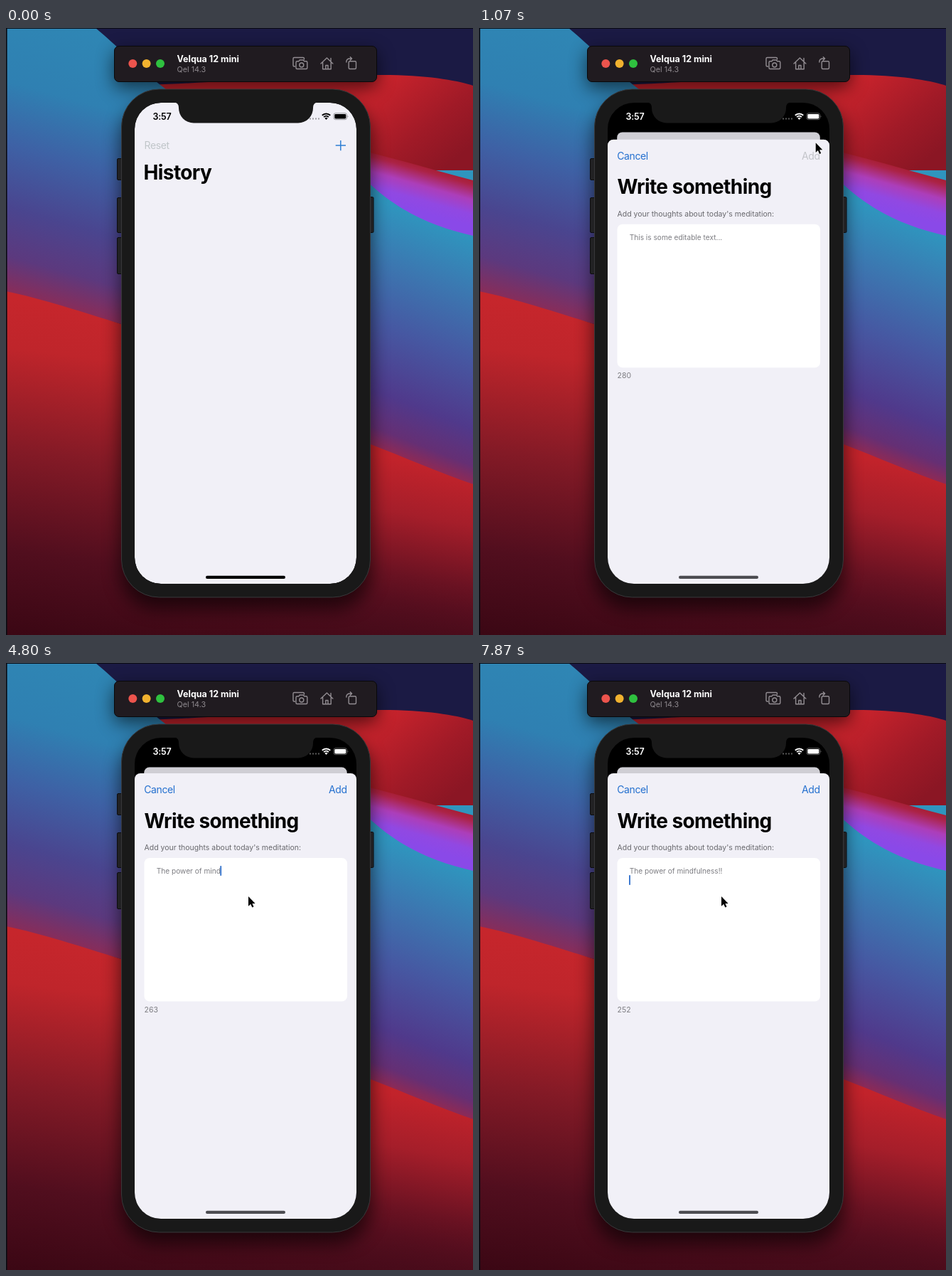
Animation of 657x853 px, one loop 8000 ms. Source, as an HTML page:

```html
<!DOCTYPE html>
<html lang="en">
<head>
<meta charset="utf-8">
<title>Writing a history entry</title>
<style>
  html, body { margin: 0; width: 100%; height: 100%; overflow: hidden; background: #000; }
  svg { display: block; width: 100%; height: 100%; }
  text { font-family: Inter, Roboto, sans-serif; font-optical-sizing: none; white-space: pre; }
  .title { font-size: 28px; font-weight: 700; letter-spacing: -.6px; }
  .bar { font-size: 14px; letter-spacing: -.4px; }
  .note { font-size: 10.5px; }
  .body { font-size: 10.15px; fill: #7d7d82; }
  .line { fill: none; stroke: #928d92; stroke-width: 1.4; stroke-linejoin: round; stroke-linecap: round; }
</style>
</head>
<body>
<svg viewBox="0 0 657 853" preserveAspectRatio="none">
  <defs>
    <linearGradient id="blueL" gradientUnits="userSpaceOnUse" x1="110" y1="0" x2="7" y2="374">
      <stop offset="0" stop-color="#2f86b4"/><stop offset=".26" stop-color="#2f80b2"/>
      <stop offset=".48" stop-color="#3e61a5"/><stop offset=".7" stop-color="#4a458f"/>
      <stop offset=".87" stop-color="#5c397e"/><stop offset="1" stop-color="#8a2c58"/>
    </linearGradient>
    <linearGradient id="redL" gradientUnits="userSpaceOnUse" x1="60" y1="385" x2="0" y2="853">
      <stop offset="0" stop-color="#c6262c"/><stop offset=".15" stop-color="#bf252b"/>
      <stop offset=".45" stop-color="#841a26"/><stop offset=".75" stop-color="#510e1e"/>
      <stop offset="1" stop-color="#3b0714"/>
    </linearGradient>
    <linearGradient id="redTop" gradientUnits="userSpaceOnUse" x1="530" y1="75" x2="625" y2="190">
      <stop offset="0" stop-color="#c8232c"/><stop offset=".6" stop-color="#a01a27"/>
      <stop offset="1" stop-color="#8b1624"/>
    </linearGradient>
    <linearGradient id="purple" gradientUnits="userSpaceOnUse" x1="570" y1="186" x2="552" y2="250">
      <stop offset="0" stop-color="#a51c2c"/><stop offset=".15" stop-color="#ab2346"/>
      <stop offset=".45" stop-color="#ac3eb9"/><stop offset=".75" stop-color="#9148e2"/>
      <stop offset="1" stop-color="#8a49e8"/>
    </linearGradient>
    <linearGradient id="blueR" gradientUnits="userSpaceOnUse" x1="585" y1="265" x2="468" y2="566">
      <stop offset="0" stop-color="#2f95be"/><stop offset=".25" stop-color="#3c76b0"/>
      <stop offset=".5" stop-color="#4658a2"/><stop offset=".78" stop-color="#50398b"/>
      <stop offset=".93" stop-color="#652f74"/><stop offset="1" stop-color="#8a2a58"/>
    </linearGradient>
    <linearGradient id="redR" gradientUnits="userSpaceOnUse" x1="585" y1="612" x2="540" y2="853">
      <stop offset="0" stop-color="#c2232b"/><stop offset=".3" stop-color="#a51e2a"/>
      <stop offset=".65" stop-color="#6a1222"/><stop offset="1" stop-color="#47091a" stop-opacity="0"/>
    </linearGradient>
    <filter id="blur" x="-30%" y="-30%" width="160%" height="180%"><feGaussianBlur stdDeviation="13"/></filter>
    <clipPath id="screen"><rect x="181" y="105" width="312" height="676" rx="37"/></clipPath>
  </defs>

  <!-- wallpaper -->
  <rect width="657" height="853" fill="#1b1a44"/>
  <path fill="url(#redTop)" d="M205 80C300 76 450 66 540 66C600 67 640 75 657 81V320H205Z"/>
  <path fill="url(#blueL)" d="M0 0H126C160 28 178 50 225 86L330 150V490L162 416L0 372Z"/>
  <path fill="url(#redL)" d="M0 370C50 380 110 400 162 416L330 470H657V853H0Z"/>
  <path fill="url(#blueR)" d="M500 200H657V650H500Z"/>
  <path fill="url(#purple)" d="M500 172C550 184 600 199 657 214V292C600 279 550 258 500 208Z"/>
  <path fill="url(#redR)" d="M330 500L513 585C560 603 610 625 657 641V853H330Z"/>
  <path fill="#0a0b12" d="M0 0H657V1H1.6V853H0Z"/>

  <!-- phone body -->
  <g filter="url(#blur)" opacity=".6">
    <rect x="161" y="104" width="353" height="712" rx="52"/>
    <rect x="152" y="33" width="370" height="51" rx="7"/>
  </g>
  <g fill="#222224" stroke="#0c0c0e">
    <rect x="156.5" y="183.5" width="9" height="30" rx="1.5"/>
    <rect x="156.5" y="238.5" width="9" height="49" rx="1.5"/>
    <rect x="156.5" y="294.5" width="9" height="51" rx="1.5"/>
    <rect x="508.5" y="237.5" width="8.5" height="50" rx="1.5"/>
  </g>
  <rect x="162.5" y="86" width="350" height="714" rx="53" fill="#191919" stroke="#38383a"/>

  <g clip-path="url(#screen)">
    <rect x="181" y="105" width="312" height="676"/>
    <g id="card">
      <rect id="page" x="181" y="105" width="312" height="676" fill="#f1f0f7"/>
      <text class="bar" x="194.5" y="170" fill="#c0c6c9">Reset</text>
      <path id="plus" d="M463.7 165H478M470.8 157.9V172.2" stroke-width="1.5"/>
      <text class="title" x="193.5" y="213">History</text>
      <rect id="shade" x="181" y="105" width="312" height="676"/>
    </g>

    <g id="status" fill="currentColor">
      <text x="206.5" y="128.8" font-size="12.5" font-weight="600" letter-spacing="-.2">3:57</text>
      <path d="M427 127.5h14" stroke="currentColor" stroke-width="2" stroke-dasharray="2 2" opacity=".35"/>
      <path d="M444.8 122.8A8 8 0 0 1 456.2 122.8M447.1 125.1A4.9 4.9 0 0 1 453.9 125.1"
            fill="none" stroke="currentColor" stroke-width="2"/>
      <path d="M450.5 129l-2.1-2.2a3 3 0 0 1 4.2 0z"/>
      <rect x="461" y="119.7" width="18.6" height="9" rx="2.6" fill="none" stroke="currentColor" stroke-width=".8" opacity=".45"/>
      <rect x="462.3" y="121" width="16" height="6.4" rx="1.4"/>
      <path d="M480.7 122.7a2 2 0 0 1 0 3z" opacity=".5"/>
    </g>

    <!-- sheet, drawn in its resting place -->
    <g id="sheet">
      <rect x="181" y="155" width="312" height="640" rx="8" fill="#f1f0f7"/>
      <text class="bar" x="194.3" y="183" fill="#2470cf">Cancel</text>
      <text class="bar" id="add" x="479.6" y="183" text-anchor="end">Add</text>
      <text class="title" x="194.5" y="231.5">Write something</text>
      <text class="note" x="194.5" y="263" fill="#68686d">Add your thoughts about today's meditation:</text>
      <rect x="194.5" y="274" width="285.5" height="201.5" rx="7.5" fill="#fff"/>
      <text class="body" id="entry" x="211.7" y="296.4"></text>
      <rect id="caret" width="2" height="14" rx=".8" fill="#3f7bd0"/>
      <text class="note" id="left" x="194.5" y="490.6" fill="#7d7d82"></text>
    </g>
    <rect id="home" x="281" y="769.8" width="112" height="4.2" rx="2.1"/>
  </g>
  <path fill="#191919" d="M236 104Q243 105 243 112A21 21 0 0 0 264 133.5H411A21 21 0 0 0 432 112Q432 105 439 104Z"/>

  <!-- window bar -->
  <rect x="152.5" y="25.5" width="369" height="50" rx="6.5" fill="#201b20" stroke="#09080a"/>
  <circle cx="178.3" cy="50" r="6" fill="#ec544d"/>
  <circle cx="197.6" cy="50" r="6" fill="#f1b22f"/>
  <circle cx="217" cy="50" r="6" fill="#2fc13f"/>
  <text x="240.5" y="48" font-size="12.5" font-weight="700" fill="#fff">Velqua 12 mini</text>
  <text x="240.5" y="62" font-size="10.8" fill="#8d888d">Qel 14.3</text>
  <g class="line">
    <path d="M406.5 54H405.5Q404 54 404 52.5V43Q404 41.5 405.5 41.5H418Q419.5 41.5 419.5 43V44"/>
    <path d="M409.5 46.7H412L413.2 45H418.3L419.5 46.7H422.3Q423.8 46.7 423.8 48.2V56Q423.8 57.5 422.3 57.5H409.5Q408 57.5 408 56V48.2Q408 46.7 409.5 46.7Z"/>
    <circle cx="415.8" cy="52" r="3"/>
    <path d="M443 50L451.4 42L459.8 50M457 47V42.5M445.6 48.5V57.7H457.2V48.5M449.8 57.5V52.5H453V57.5"/>
    <rect x="482.2" y="46.7" width="10.3" height="10.8" rx="1.5"/>
    <path d="M478.8 48Q478.8 43 484 43H486M484.3 40.8L486.6 43L484.3 45.2"/>
  </g>

  <path id="mouse" d="M0 0V13.8L3.2 10.8L5.3 15.6L7.5 14.6L5.4 9.9H9.6Z" stroke="#fff" stroke-width="1.1" paint-order="stroke"/>
</svg>
<script>
const $ = id => document.getElementById(id);
const set = (id, attrs) => { for (const k in attrs) $(id).setAttribute(k, attrs[k]); };
const clamp = x => Math.max(0, Math.min(1, x));
const mix = (a, b, p) => a + (b - a) * p;
const rgb = (a, b, p) => `rgb(${a.map((v, i) => Math.round(mix(v, b[i], p)))})`;
const smooth = p => p * p * (3 - 2 * p);

const FPS = 15, LOOP = 8000;
const TEXT = 'The power of mindfulness!! \n', HINT = 'This is some editable text...';
// tick at which each character is typed
const KEYS = [30, 37, 38, 39, 44, 45, 49, 50, 52, 53, 56, 58, 60, 65, 67, 69, 72,
              77, 79, 84, 90, 94, 96, 99, 105, 109, 111, 117];

// critically damped spring, 0 to 1
function spring(ms) {
  const x = Math.max(0, ms) * .02479;
  return 1 - (1 + x) * Math.exp(-x);
}

function draw(now) {
  const k = Math.floor((now % LOOP) * FPS / 1000 + .1);
  const p = spring(k * 1000 / FPS - 738);

  set('card', { transform: `translate(337 ${105 + 41.5 * p}) scale(${1 - .085 * p}) translate(-337 -105)` });
  set('page', { rx: mix(37, 8, p) });
  set('shade', { opacity: .14 * p, rx: mix(37, 8, p) });
  set('plus', { stroke: k < 10 ? '#2f7fd3' : k < 12 ? '#a9c6ea' : '#9aa9b6' });
  set('sheet', { transform: `translate(0 ${627 * (1 - p)})` });
  set('status', { color: rgb([0, 0, 0], [255, 255, 255], clamp((k - 12) / 2.2)) });
  set('home', { fill: k < 12 ? '#000' : '#4c4c51' });

  const typed = KEYS.filter(t => t <= k).length, focused = k >= 22;
  const value = TEXT.slice(0, typed), wrapped = value.endsWith('\n');
  $('entry').textContent = focused ? value.trimEnd() + (value.endsWith(' ') ? ' ' : '') : HINT;
  $('left').textContent = 280 - typed;
  const width = wrapped || !typed ? 0 : $('entry').getComputedTextLength();
  set('caret', { x: 211 + width, y: wrapped ? 298 : 285, opacity: +focused });
  set('add', { fill: rgb([195, 196, 201], [36, 112, 207], clamp((k - 29) / 5)) });

  // pointer enters from the right, then goes to the text box
  const enter = clamp((k - 4) / 3), go = smooth(clamp((k - 16) / 4));
  set('mouse', {
    transform: `translate(${mix(mix(508, 473.7, enter), 341, go)} ${mix(mix(155, 161.3, enter), 328, go)})`,
    opacity: +(k >= 4)
  });
}

const start = performance.now();
function loop() {
  draw(performance.now() - start);
  requestAnimationFrame(loop);
}
loop();
</script>
</body>
</html>
```
